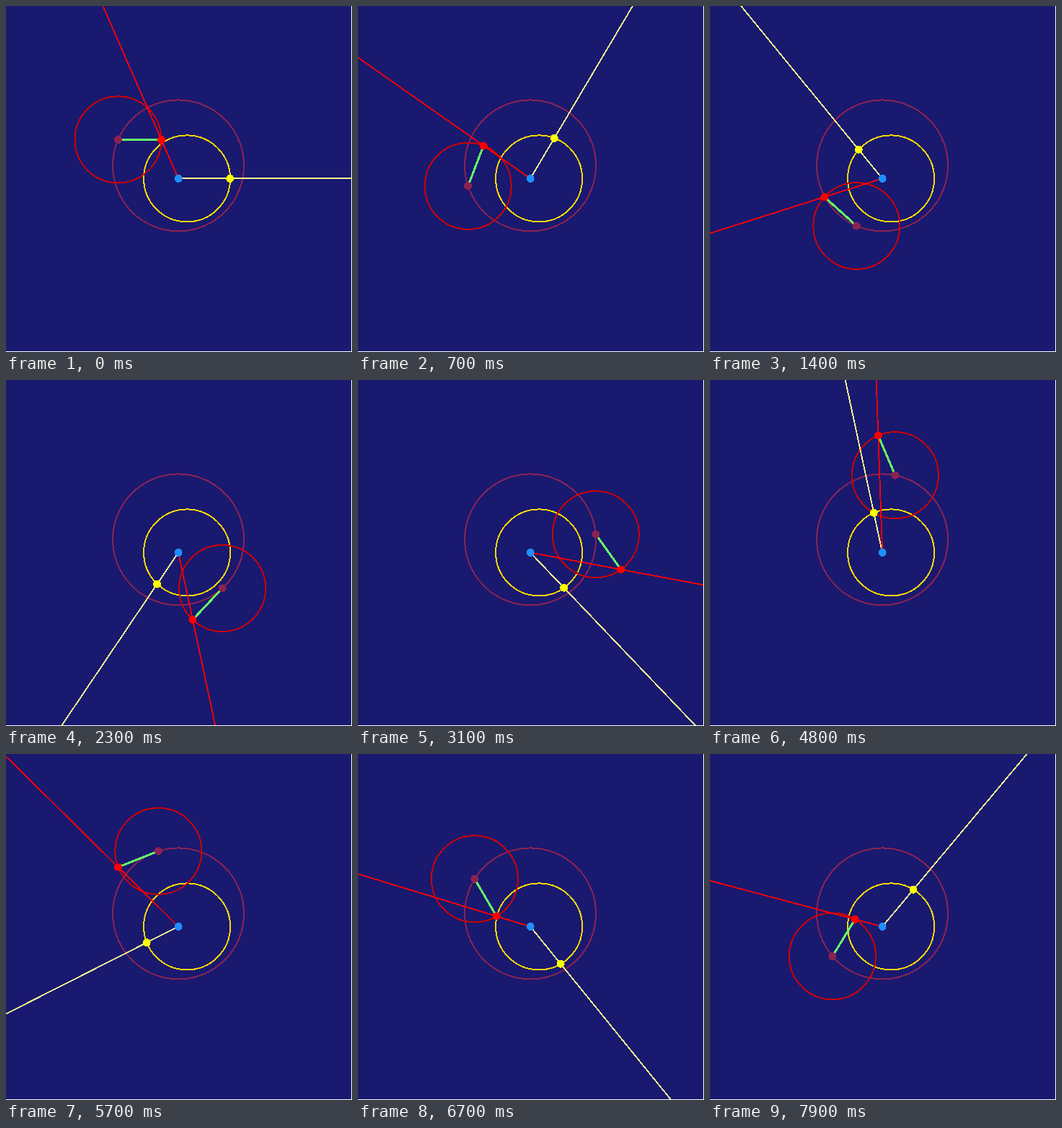
These frames come from a looping animation (480x480 px, 8000 ms). An HTML page without scripts:

```html
<!DOCTYPE html>
<html lang="en">
<head>
<meta charset="utf-8">
<title>Epicycle model</title>
<style>
@property --n { syntax: "<number>"; inherits: true; initial-value: 0; }

html, body { margin: 0; width: 100%; height: 100%; overflow: hidden; background: #fff; }
/* The sky leaves a one pixel white edge at the right and bottom. */
svg { display: block; width: 479px; height: 479px; background: #191970; shape-rendering: crispEdges; }

/* One step is ten days; y points down, angles run counter-clockwise. */
#sky {
  animation: days 8s steps(80) infinite;
  --a: calc(var(--n) * 9.8563deg);
  --b: calc(180deg + var(--n) * 5.2404deg);
  --ex: calc(60 * cos(var(--a)));
  --ey: calc(-60 * sin(var(--a)));
  --sx: calc(11.7 + var(--ex));
  --sy: var(--ey);
  /* distance from the equant to the deferent along angle b */
  --s: calc(sqrt(91 * 91 - 36 * 36 * cos(var(--b)) * cos(var(--b))) - 36 * sin(var(--b)));
  --px: calc(var(--s) * cos(var(--b)));
  --py: calc(-54 - var(--s) * sin(var(--b)));
  --mx: calc(var(--px) + var(--ex));
  --my: calc(var(--py) + var(--ey));
}
@keyframes days { from { --n: 0; } to { --n: 80; } }

.ring { fill: none; stroke-width: 2; }
.ray { stroke-width: 1.9; }
.sun { transform: translate(calc(var(--sx) * 1px), calc(var(--sy) * 1px)); }
.pivot { transform: translate(calc(var(--px) * 1px), calc(var(--py) * 1px)); }
.planet { transform: translate(calc(var(--mx) * 1px), calc(var(--my) * 1px)); }
.sun-ray { transform: rotate(atan2(var(--sy), var(--sx))); }
.planet-ray { transform: rotate(atan2(var(--my), var(--mx))); }
.arm { transform: rotate(calc(-1 * var(--a))); stroke-width: 3; }
</style>
</head>
<body>
<svg viewBox="0 0 479 479">
  <g transform="translate(239.1 239.4)">
    <g id="sky">
      <circle class="ring" cy="-18" r="91" stroke="#8b2252"/>
      <circle class="ring" cx="12" r="60" stroke="#ffd700"/>
      <g class="pivot">
        <circle class="ring" r="60" stroke="#cd0000"/>
        <line class="arm" x2="60" stroke="#6f6"/>
        <circle r="5.5" fill="#8b2252"/>
      </g>
      <line class="ray sun-ray" x2="500" stroke="#fff68f"/>
      <line class="ray planet-ray" x2="500" stroke="#f00"/>
      <circle class="sun" r="5.5" fill="#ff0"/>
      <circle class="planet" r="5.5" fill="#f00"/>
      <circle r="5.5" fill="#1e90ff"/>
    </g>
  </g>
</svg>
</body>
</html>
```
